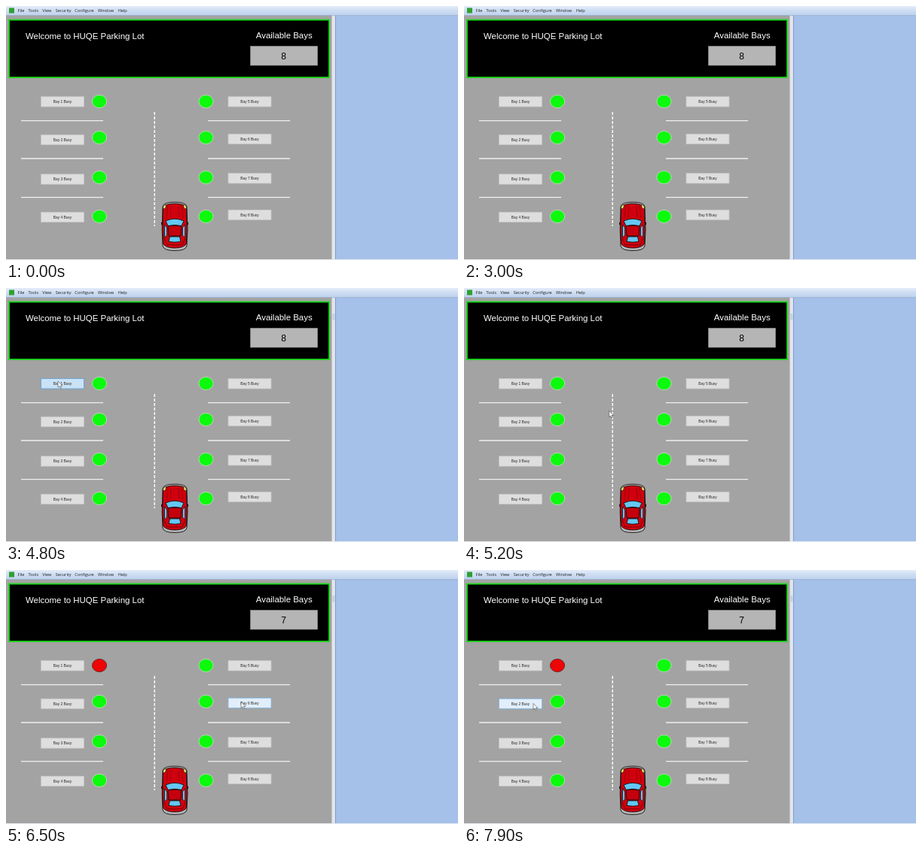
An HTML page for the animation above (8000 ms loop, 600x338 px).

```html
<!DOCTYPE html>
<html lang="en">
<head>
<meta charset="utf-8">
<title>Parking lot</title>
<style>
html, body { margin: 0; width: 100%; height: 100%; overflow: hidden; background: #a3a3a3 }
svg { display: block; width: 600px; height: 338px }
text { font-family: "Liberation Sans", Arial, sans-serif }
.menu text { font: 5.6px "Open Sans", "Noto Sans", sans-serif; fill: #222 }
.title { font-size: 11.45px; fill: #fff }
.bay text { font-size: 4.8px; text-anchor: middle; fill: #222 }
.bay rect { fill: #dedede; stroke: #c3c3c3; stroke-width: .8 }
.bay.hover rect { fill: #e2eefa; stroke: #7fb5e3 }
.bay.press rect { fill: #c9e2f6; stroke: #5c9fd6 }
.bay ellipse { fill: #0cfa0c; stroke: #c4dcc4; stroke-width: .8 }
.bay.busy ellipse { fill: #ee0505; stroke: #5a2424 }
</style>
</head>
<body>
<svg viewBox="0 0 600 338">
  <defs>
    <linearGradient id="bar" x2="0" y2="1">
      <stop stop-color="#e4edf9"/><stop offset=".45" stop-color="#cfdef2"/><stop offset="1" stop-color="#bdd2ee"/>
    </linearGradient>
  </defs>
  <rect width="600" height="338" fill="#a3a3a3"/>
  <rect x="437" y="12" width="163" height="326" fill="#a5c0e9"/>
  <rect x="432.5" y="12" width="4.5" height="326" fill="#e3e6ea"/>
  <rect id="thumb" x="433.3" y="34" width="3.2" height="8.5" fill="#c6d1df"/>
  <path d="M437.4 12V338" stroke="#6f93c6" stroke-width=".8"/>
  <path d="M0 337.5H600" stroke="#e6ebf1"/>
  <rect width="600" height="12.5" fill="url(#bar)"/>
  <path d="M0 12.6H600" stroke="#98acc8" stroke-width=".7"/>
  <rect x="4" y="2.5" width="7" height="7" fill="#30a030"/>
  <g class="menu" id="menu"></g>

  <rect x="4" y="18.5" width="425" height="76.5" fill="#000" stroke="#18d818" stroke-width="1.8"/>
  <text class="title" x="26" y="43.8">Welcome to HUQE Parking Lot</text>
  <text class="title" x="331.8" y="43">Available Bays</text>
  <rect x="324.5" y="53.5" width="89" height="25.5" fill="#b5b5b5" stroke="#8c8c8c" stroke-width=".7"/>
  <text id="count" x="368.5" y="71" font-size="12" text-anchor="middle">8</text>

  <path d="M20 152.6H129M20 203H129M20 254.6H129M268 152.6H377M268 203H377M268 254.6H377" stroke="#f0f0f0" stroke-width="1.3"/>
  <path d="M197.2 141V293" stroke="#fff" stroke-width="1.4" stroke-dasharray="4 2"/>
  <g id="bays"></g>

  <g stroke="#111" stroke-width=".9" stroke-linejoin="round">
    <path d="M208 288h-1.5v3h3zM240 288h1.5v3h-3z" fill="#c4000c"/>
    <path d="M208 267Q209 261 224 261T240 267L241 298 240 319Q239 325.5 224 325.5T208 319L207.2 298Z" fill="#b8b8b8"/>
    <path d="M208.5 268Q212 263 224 263T239.5 268L240.3 298 239.3 317Q235 322 224 322T208.8 317L207.8 298Z" fill="#d0000e"/>
    <path d="M208.5 270l.5-4 3.5-2-.8 5zM239.5 270l-.5-4-3.5-2 .8 5z" fill="#f4ee70" stroke-width=".6"/>
    <path d="M215 265L213 283M233 265L235 283M219 266L218 281M229 266L230 281" fill="none" stroke="#7c0008" stroke-width=".6"/>
    <path d="M212 286Q224 280.5 236 286L233 292.5Q224 290.5 215 292.5Z" fill="#64c8f4"/>
    <path d="M215 293Q224 291 233 293L232 306H216Z" fill="#c4000c"/>
    <path d="M210.5 291l3 4v10l-3 3zM237.5 291l-3 4v10l3 3z" fill="#64c8f4" stroke-width=".7"/>
    <path d="M217.5 307H230.5L232 313.5Q224 315 216 313.5Z" fill="#64c8f4"/>
    <path d="M210 309L214 318H234L238 309" fill="none" stroke="#500" stroke-width=".7"/>
  </g>
  <path id="cursor" d="M0 0V8.2L1.9 6.5 3.2 9.4 4.6 8.8 3.3 6H5.9Z" fill="#fff" stroke="#444" stroke-width=".6"/>
</svg>
<script>
const $ = id => document.getElementById(id);

$('menu').innerHTML = [['File', 15.5], ['Tools', 29.5], ['View', 48.3], ['Security', 65.8],
  ['Configure', 91.3], ['Window', 122], ['Help', 148.7]]
  .map(([name, x]) => `<text x="${x}" y="8">${name}</text>`).join('');

const lampY = [127, 175, 228, 280];
const buttonY = [127.3, 178, 230.5, 281, 127.3, 177, 229.3, 278];
$('bays').innerHTML = buttonY.map((y, i) => {
  const x = i < 4 ? 46.5 : 295, lampX = i < 4 ? 124 : 265.5;
  return `<g class="bay"><rect x="${x}" y="${y - 6.7}" width="57" height="13.4"/>
    <text x="${x + 28.5}" y="${y + 1.7}">Bay ${i + 1} Busy</text>
    <ellipse cx="${lampX}" cy="${lampY[i % 4]}" rx="9.6" ry="8.6"/></g>`;
}).join('');
const bays = [...$('bays').children];

// Pointer path: time, x, y
const path = [
  [3400, 234, 311], [3600, 190, 245], [3800, 118, 158], [4000, 85, 130], [4200, 85, 127],
  [4300, 85, 127], [4500, 69, 124], [5000, 69, 124], [5100, 112, 138], [5200, 192.7, 163.5],
  [5400, 272, 194], [5500, 272, 194], [5800, 296, 186], [6400, 312, 175.5],
  [7100, 312, 175.5], [7200, 250, 179], [7300, 168.3, 179.5], [7500, 122, 179],
  [7800, 92, 177.5], [8000, 92, 177.5]
];

function pointer(t) {
  const i = path.findIndex(p => p[0] > t);
  const [t0, x0, y0] = path[i - 1], [t1, x1, y1] = path[i];
  const k = (t - t0) / (t1 - t0);
  return [x0 + (x1 - x0) * k, y0 + (y1 - y0) * k];
}

function draw(now) {
  const t = Math.floor(now % 8000 / 100) * 100;
  const shown = t >= 3400, parked = t >= 5700;
  const [x, y] = shown ? pointer(t) : [-20, -20];
  $('cursor').setAttribute('transform', `translate(${x} ${y})`);
  $('thumb').style.opacity = t >= 3100 ? 1 : 0;
  $('count').textContent = parked ? 7 : 8;
  bays.forEach((bay, i) => {
    const left = i < 4 ? 46 : 295;
    const over = x >= left && x <= left + 58 && Math.abs(y - buttonY[i]) < 7;
    bay.classList.toggle('hover', over);
    bay.classList.toggle('press', over && t === 4800);
    bay.classList.toggle('busy', i === 0 && parked);
  });
  requestAnimationFrame(draw);
}
requestAnimationFrame(draw);
</script>
</body>
</html>
```
